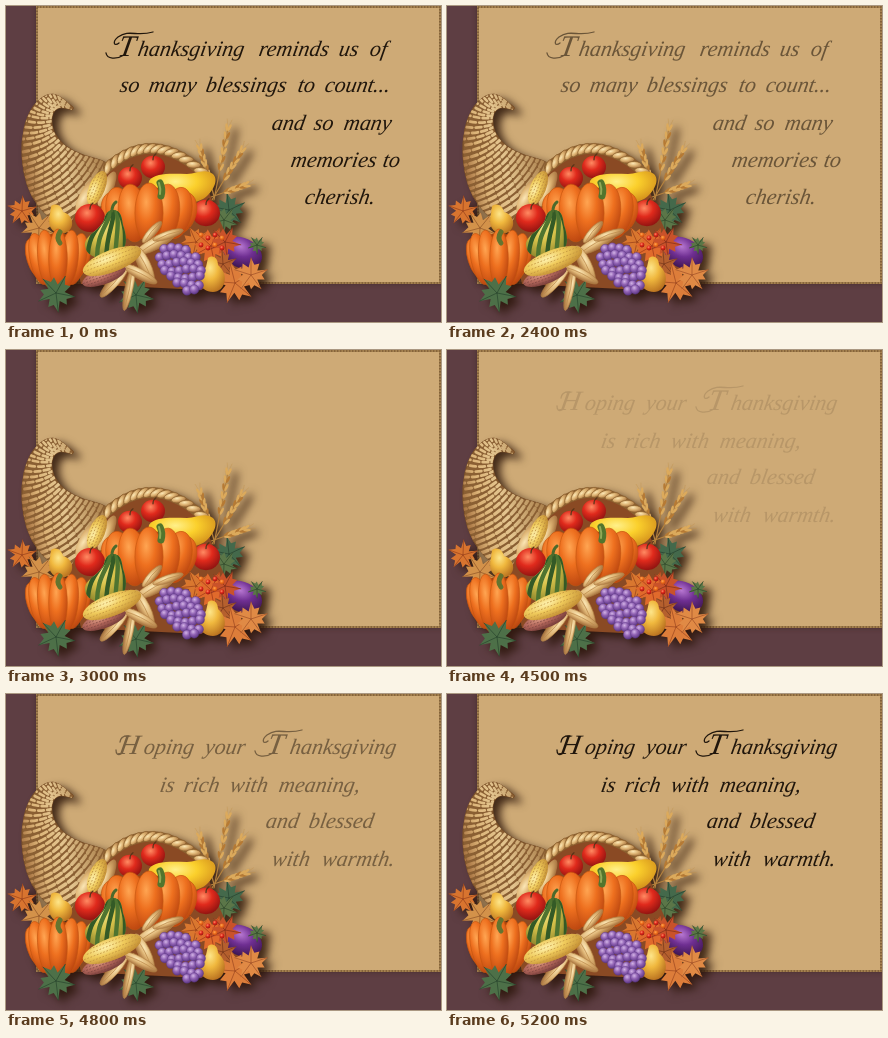
Recreate the animation shown at these times as an HTML page. Size 435x316 px, loop 8200 ms.

```html
<!DOCTYPE html>
<html lang="en">
<head>
<meta charset="utf-8">
<title>Harvest greeting</title>
<style>
html, body { margin: 0; width: 100%; height: 100%; overflow: hidden; background: #5e3e43; }
svg { display: block; width: 100vw; height: 100vh; }
.message { font-family: "Liberation Serif", "Noto Serif", serif; font-style: italic; fill: #20160c; }
.swash { fill: none; stroke: #20160c; stroke-width: 1.3; stroke-linecap: round; }
.harvest { filter: drop-shadow(7px 5px 4px rgba(42, 20, 8, .85)); }
</style>
</head>
<body>
<svg id="stage" viewBox="0 0 435 316" preserveAspectRatio="none"></svg>
<script>
const LOOP = 8200;

const repeat = (n, draw) => Array.from({ length: n }, (_, i) => draw(i)).join('');
const shape = (d, fill, extra = '') => `<path d="${d}" fill="${fill}" ${extra}/>`;
const line = (d, color, width = 1, extra = '') =>
  `<path d="${d}" fill="none" stroke="${color}" stroke-width="${width}" stroke-linecap="round" ${extra}/>`;
const oval = (x, y, rx, ry, fill, angle = 0, extra = '') =>
  `<ellipse cx="${x}" cy="${y}" rx="${rx}" ry="${ry}" fill="${fill}" transform="rotate(${angle} ${x} ${y})" ${extra}/>`;
const place = (x, y, angle, body) => `<g transform="translate(${x} ${y}) rotate(${angle})">${body}</g>`;

const tones = {
  apple: ['#ff8a62', '#e02a1c', '#8c1210'],
  orange: ['#ffa552', '#ee701f', '#b8430f'],
  lemon: ['#fff08a', '#fbd02c', '#d08a1a'],
  pear: ['#fde58a', '#f0b83e', '#b8701f'],
  grape: ['#d2b3e6', '#9163b4', '#573280'],
  plum: ['#b878d2', '#6f2f92', '#3a154c'],
  gourd: ['#f4e68a', '#d8c24a', '#85802a'],
  maize: ['#fff3b0', '#f0cb5c', '#c08a30'],
  rose: ['#dc9b83', '#b4685c', '#743a38'],
  husk: ['#fbe6b4', '#deb474', '#a06a38'],
};
const fillOf = name => `url(#${name})`;

function gradients() {
  return Object.entries(tones).map(([id, [light, mid, dark]]) =>
    `<radialGradient id="${id}" cx=".4" cy=".32" r=".72">
      <stop offset="0" stop-color="${light}"/><stop offset=".45" stop-color="${mid}"/>
      <stop offset="1" stop-color="${dark}"/></radialGradient>`).join('') +
    `<linearGradient id="wicker" gradientUnits="userSpaceOnUse" x1="14" y1="150" x2="104" y2="130">
      <stop offset="0" stop-color="#a5703f"/><stop offset=".2" stop-color="#dcb478"/>
      <stop offset=".45" stop-color="#e3c48e"/><stop offset="1" stop-color="#9a6c38"/></linearGradient>`;
}

function leaf(x, y, r, angle, color, vein) {
  const reach = [1, .64, .84, .46];
  const at = i => {
    const a = i * Math.PI / 10;
    return `${(r * reach[i % 4] * Math.cos(a)).toFixed(1)} ${(r * reach[i % 4] * Math.sin(a)).toFixed(1)}`;
  };
  const edge = Array.from({ length: 20 }, (_, i) => at(i)).join('L');
  return place(x, y, angle, shape(`M${edge}Z`, color) + repeat(5, i => line(`M0 0L${at(i * 4)}`, vein, .7)));
}

function pumpkin(x, y, rx, ry) {
  return oval(x, y, rx * .97, ry * .86, '#a9430d') +
    [-3, 3, -2, 2, -1, 1, 0].map(k => oval(x + rx * .7 * Math.sin(k * Math.PI / 6), y, rx * .3,
      ry * Math.cos(k * .26), fillOf('orange'), k * 6, 'stroke="#c4560f" stroke-width=".6"')).join('');
}

function corn(x, y, length, width, angle, tone, seam) {
  return place(x, y, angle, oval(0, 0, length, width, fillOf(tone)) + repeat(5, i => {
    const v = (i - 2) * .36;
    const half = length * Math.sqrt(1 - v * v) * .95;
    return line(`M${-half} ${v * width}H${half}`, seam, .7, `stroke-dasharray="1 2.4" stroke-dashoffset="${i % 2}"`);
  }));
}

function wheat(x, y, tipX, tipY) {
  const dx = tipX - x, dy = tipY - y;
  const angle = Math.atan2(dy, dx) * 180 / Math.PI;
  return line(`M${x} ${y}L${tipX} ${tipY}`, '#b5823e', 1.2) + repeat(12, i => {
    const t = .45 + .55 * Math.floor(i / 2) / 5, side = i % 2 ? 1 : -1;
    return place(x + dx * t, y + dy * t, angle + side * 16,
      oval(1, side * 1.2, 3.8, 1.3, i % 3 ? '#dcaa5c' : '#b67a34') + line('M4 0L9 0', '#c1924e', .4));
  });
}

function horn() {
  const outer = [[63, 98], [51, 86], [34, 91], [21, 109], [15, 136], [17, 166], [25, 191], [42, 212], [70, 232]];
  const inner = [[66, 104], [57, 101], [49, 103], [45, 112], [47, 126], [58, 140], [78, 150], [101, 155], [116, 168]];
  const along = (pts, t) => {
    const i = Math.min(pts.length - 2, Math.floor(t)), f = t - i;
    return [0, 1].map(c => pts[i][c] + (pts[i + 1][c] - pts[i][c]) * f);
  };
  const spline = pts => pts.slice(1, -1).map((p, i) => {
    const next = pts[i + 2], last = i === pts.length - 3;
    const end = last ? next : [(p[0] + next[0]) / 2, (p[1] + next[1]) / 2];
    return `Q${p} ${end}`;
  }).join('');
  const back = inner.slice().reverse();
  const outline = `M${outer[0]}${spline(outer)}L${back[0]}${spline(back)}Q70 102 63 98Z`;
  const ribs = repeat(36, i => {
    const t = .1 + i * 7.8 / 35, [ax, ay] = along(outer, t), [bx, by] = along(inner, t);
    const bend = .04 + t * .025;
    const mx = (ax + bx) / 2 - (by - ay) * bend, my = (ay + by) / 2 + (bx - ax) * bend;
    return line(`M${ax} ${ay}Q${mx} ${my} ${bx} ${by}`, 'url(#wicker)', 2 + t * .24,
      `stroke-dasharray="${4 + t * .5} 3.5" stroke-dashoffset="${i * 3}"`);
  });
  return `<clipPath id="hornClip"><path d="${outline}"/></clipPath>` +
    shape(outline, '#8a5f33', 'stroke="#7a5028" stroke-width="1"') +
    `<g clip-path="url(#hornClip)">${ribs}</g>`;
}

function rope() {
  const bezier = (a, b, c, t) => (1 - t) ** 2 * a + 2 * t * (1 - t) * b + t * t * c;
  return line('M102 161Q146 122 195 165', '#8b5f30', 10) + repeat(14, i => {
    const t = i / 13;
    const slope = Math.atan2(2 * (1 - t) * -39 + 2 * t * 43, 2 * (1 - t) * 44 + 2 * t * 49) * 180 / Math.PI;
    return oval(bezier(102, 146, 195, t), bezier(161, 122, 165, t), 7.4, 3.4, fillOf('husk'), slope - 34,
      'stroke="#8b612e" stroke-width=".7"');
  });
}

function grapes() {
  return [4, 6, 6, 6, 5, 4, 2].map((count, row) => repeat(count, i =>
    oval(169 + row * 2.6 + (i - (count - 1) / 2) * 7.2, 243 + row * 7 + Math.sin(i * 5 + row) * 1.5, 4.7, 4.7,
      fillOf('grape'), 0, 'stroke="#5c3884" stroke-width=".4"'))).join('');
}

function gourd() {
  const body = 'M106 204C115 203 116 212 117 219C122 233 121 244 110 250C97 256 80 251 79 240C78 229 93 226 98 214C99 209 101 205 106 204Z';
  return `<clipPath id="gourdClip"><path d="${body}"/></clipPath>` + shape(body, fillOf('gourd')) +
    `<g clip-path="url(#gourdClip)">${repeat(5, i =>
      line(`M${104 + i * 2} 202C${96 + i * 6} 220 ${80 + i * 10} 226 ${82 + i * 9} 257`, i % 2 ? '#4f7430' : '#345a26', 4.4)
    )}</g>` + line('M106 205Q106 199 110 196', '#4c6a2c', 3);
}

function husks() {
  return [[150, 237, 22, 6, -28], [162, 229, 16, 4, -18], [146, 226, 14, 4, -48], [138, 258, 20, 6, 64],
    [108, 276, 20, 5, 132], [123, 282, 23, 4, 102], [134, 268, 19, 5, 28]]
    .map(([x, y, rx, ry, angle]) => oval(x, y, rx, ry, fillOf('husk'), angle, 'stroke="#b18145" stroke-width=".6"') +
      place(x, y, angle, line(`M${-rx * .8} 1Q0 -2 ${rx * .8} 0`, '#bd8c4e', .7))).join('');
}

function harvest() {
  const apple = (x, y, r) => oval(x, y, r, r * .94, fillOf('apple')) +
    line(`M${x} ${y - r * .6}q0 -4 3 -6`, '#59351a', 1.3);
  return leaf(16, 205, 15, 200, '#d8742f', '#9c451d') + leaf(33, 222, 18, 165, '#d3924a', '#94592a') +
    leaf(223, 204, 17, -25, '#44694b', '#2a4632') + leaf(218, 214, 14, 20, '#5b7648', '#344c2e') +
    wheat(208, 194, 222, 122) + wheat(206, 194, 236, 144) + wheat(208, 190, 194, 142) + wheat(205, 191, 240, 179) +
    horn() + shape('M98 166Q143 125 197 170L214 215L236 262L195 284L75 278L62 220Z', '#8a4a24') + rope() +
    oval(82, 190, 21, 8, fillOf('husk'), -60) + oval(101, 183, 19, 6, fillOf('husk'), -66) +
    corn(91, 182, 18, 8, -68, 'maize', '#b9883c') +
    apple(124, 172, 12) + apple(147, 161, 12) + apple(200, 207, 14) +
    shape('M143 175C149 166 167 168 181 168C191 168 198 162 207 168C213 174 207 184 202 189C192 200 166 200 156 190C148 185 141 181 143 175Z', fillOf('lemon')) +
    pumpkin(143, 207, 47, 30) +
    line('M155 190Q157 183 154 177', '#52752d', 7) + line('M154 188Q155 183 153 177', '#91a956', 2) +
    shape('M45 200C51 196 56 201 57 206C69 209 70 226 56 228C42 227 42 214 44 208Z', fillOf('pear')) +
    apple(84, 212, 15) + pumpkin(52, 253, 31, 30) +
    line('M54 237Q50 232 54 226', '#64742f', 5) + gourd() +
    leaf(50, 287, 19, 155, '#4d7048', '#2c4a30') + leaf(130, 289, 18, 85, '#4d7048', '#2c4a30') +
    husks() + corn(98, 270, 23, 8, -20, 'rose', '#7d4640') + corn(106, 255, 31, 11, -21, 'maize', '#c29340') +
    leaf(190, 236, 16, 30, '#d9772f', '#9c431b') + leaf(205, 240, 20, -65, '#e06a2c', '#a23c1a') +
    oval(236, 247, 21, 15, fillOf('plum'), 25) + leaf(251, 239, 9, -55, '#5a7646', '#344c2e') +
    leaf(219, 236, 16, 10, '#c9522a', '#86301b') + leaf(217, 258, 14, 50, '#b5602e', '#7a391c') +
    repeat(8, i => oval(195 + i % 4 * 7, 229 + Math.floor(i / 4) * 10 + i % 2 * 3, 2.4, 2.4, fillOf(i % 3 ? 'apple' : 'orange'))) +
    leaf(229, 277, 21, 40, '#dd7d3a', '#a04a22') + leaf(245, 269, 17, -18, '#e08a45', '#a5552a') +
    shape('M202 252C208 248 212 253 212 259C224 269 219 286 207 286C193 286 190 271 200 261Z', fillOf('pear')) +
    grapes();
}

// Each row: baseline, then pairs of x and word.
const verses = {
  first: [
    [50, 131, 'hanksgiving', 252, 'reminds', 332, 'us', 363, 'of'],
    [86, 113, 'so', 142, 'many', 199, 'blessings', 291, 'to', 318, 'count...'],
    [124, 265, 'and', 307, 'so', 337, 'many'],
    [161, 284, 'memories', 376, 'to'],
    [198, 298, 'cherish.'],
  ],
  second: [
    [60, 137, 'oping', 198, 'your', 283, 'hanksgiving'],
    [98, 153, 'is', 177, 'rich', 223, 'with', 272, 'meaning,'],
    [134, 259, 'and', 302, 'blessed'],
    [172, 265, 'with', 315, 'warmth.'],
  ],
};

// The extra slant brings the italic closer to handwriting.
const word = (x, y, text, size = 22) =>
  `<text transform="translate(${x} ${y}) skewX(-10)" font-size="${size}">${text}</text>`;
const swash = d => `<path class="swash" d="${d}"/>`;
const fancyT = (x, y) => word(x + 11, y, 'T', 30) +
  swash(`M${x + 47} ${y - 24}C${x + 30} ${y - 19} ${x + 24} ${y - 27} ${x + 12} ${y - 19}C${x + 6} ${y - 14} ${x + 8} ${y - 9} ${x + 13} ${y - 13}`) +
  swash(`M${x + 18} ${y - 1}C${x + 10} ${y + 4} ${x + 1} ${y + 3} ${x} ${y - 3}`);
const fancyH = (x, y) => word(x + 2, y, 'H', 28) +
  swash(`M${x + 5} ${y}Q${x} ${y + 2} ${x} ${y - 4}M${x + 13} ${y - 18}Q${x + 5} ${y - 19} ${x + 4} ${y - 12}`);

const verse = rows => rows.map(([y, ...cells]) =>
  repeat(cells.length / 2, i => word(cells[i * 2], y, cells[i * 2 + 1]))).join('');

document.getElementById('stage').innerHTML = `
  <defs>${gradients()}<filter id="soft"><feGaussianBlur stdDeviation="2"/></filter></defs>
  <rect width="435" height="316" fill="#5e3e43"/>
  <rect x="29" y="-3" width="409" height="282" fill="#34201f" opacity=".4" filter="url(#soft)"/>
  <rect x="30" width="405" height="278" fill="#ceaa76"/>
  <rect x="31" y="1" width="403" height="276" fill="none" stroke="#a5824f" stroke-width="2"/>
  <rect x="31" y="1" width="403" height="276" fill="none" stroke="#7c5b36" stroke-width="1.6" stroke-dasharray="1.4 1.6"/>
  <g class="harvest">${harvest()}</g>
  <g class="message" id="first">${fancyT(100, 50)}${verse(verses.first)}</g>
  <g class="message" id="second">${fancyH(110, 60)}${fancyT(249, 60)}${verse(verses.second)}</g>`;

const first = document.getElementById('first');
const second = document.getElementById('second');
const stepsSince = (time, start) => Math.floor((time - start) / 100);

function update(time) {
  const out = stepsSince(time, 2000), into = stepsSince(time, 4500);
  first.setAttribute('opacity', out < 0 ? 1 : Math.max(0, .96 * (1 - out / 10)));
  second.setAttribute('opacity', Math.max(0, Math.min(1, (into + 1) / 8)));
}

const start = performance.now();
function frame(now) {
  update(Math.max(0, now - start) % LOOP);
  requestAnimationFrame(frame);
}
update(0);
requestAnimationFrame(frame);
</script>
</body>
</html>
```
